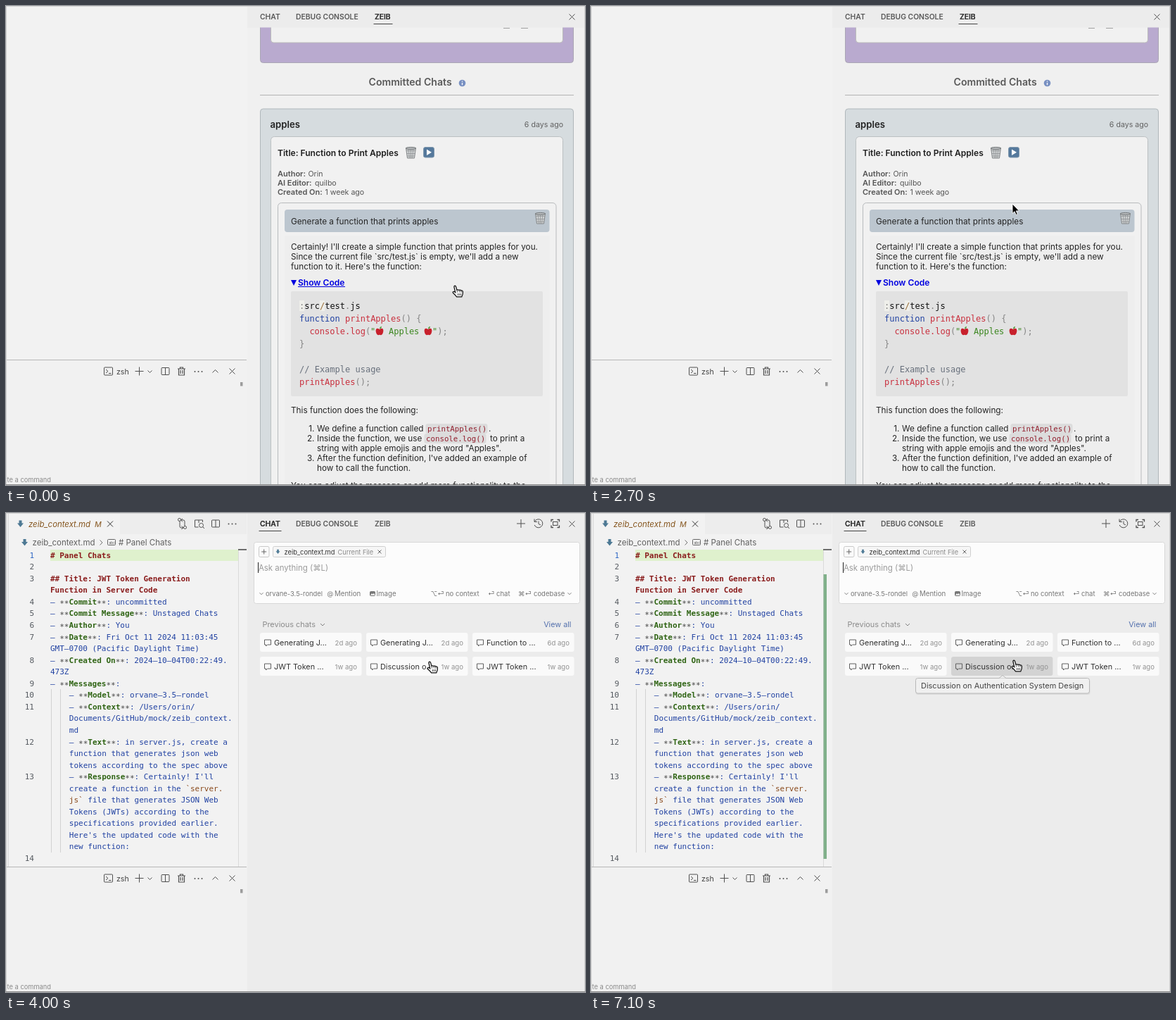
An HTML page for the animation above (7200 ms loop, 823 by 680 pixels).

```html
<!DOCTYPE html>
<html lang="en">
<head>
<meta charset="utf-8">
<title>Committed chats panel</title>
<style>
html, body { margin: 0; width: 100%; height: 100%; overflow: hidden; background: #f2f2f2; }
svg { display: block; }
text { font-family: Inter, "DejaVu Sans", sans-serif; white-space: pre; }
.mono { font-family: "DejaVu Sans Mono", monospace; }
.bold { font-weight: 600; }
.end { text-anchor: end; }
.italic { font-style: italic; }
</style>
</head>
<body>
<svg id="stage" width="823" height="680" viewBox="0 0 823 680"></svg>
<script>
const LOOP = 7200, FILE = 'zeib_context.md', MODEL = 'orvane-3.5-rondel';

const text = (x, y, s, size = 11.75, fill = '#242424', cls = '') =>
  `<text x="${x}" y="${y}" font-size="${size}" fill="${fill}" class="${cls}">${s}</text>`;
const box = (x, y, w, h, fill, stroke = 'none', r = 0) =>
  `<rect x="${x}" y="${y}" width="${w}" height="${h}" rx="${r}" fill="${fill}" stroke="${stroke}"/>`;
const circle = (x, y, r, fill, stroke = 'none') =>
  `<circle cx="${x}" cy="${y}" r="${r}" fill="${fill}" stroke="${stroke}"/>`;
const line = (d, stroke = '#505050', width = 1, fill = 'none') =>
  `<path d="${d}" stroke="${stroke}" stroke-width="${width}" fill="${fill}"/>`;
const shape = (d, fill) => `<path d="${d}" fill="${fill}"/>`;
const span = (s, fill, cls = '') => `<tspan fill="${fill}" class="${cls}">${s}</tspan>`;
const group = (id, s) => `<g id="${id}">${s}</g>`;

const cross = (x, y, r = 4, c) => line(`M${x - r} ${y - r}l${2 * r} ${2 * r}m0 ${-2 * r}l${-2 * r} ${2 * r}`, c);
const plus = (x, y, r = 6, c) => line(`M${x - r} ${y}h${2 * r}M${x} ${y - r}v${2 * r}`, c);
const chevron = (x, y, r = 3, c = '#808080') => line(`M${x - r} ${y - r / 2}l${r} ${r}l${r} ${-r}`, c);
const dots = (x, y) => [-5, 0, 5].map(d => circle(x + d, y, 1, '#505050')).join('');
const split = (x, y) => box(x - 5.5, y - 5, 11, 10, 'none', '#505050', 1) + line(`M${x} ${y - 5}v10`);
const fileMark = (x, y, k = 1) =>
  shape(`M${x - 2 * k} ${y - 5 * k}h${4 * k}v${4 * k}h${2.5 * k}l${-4.5 * k} ${5.5 * k}l${-4.5 * k} ${-5.5 * k}h${2.5 * k}z`, '#4d7994');
const bubble = (x, y) => line(`M${x} ${y}h9v7h-5l-2 2v-2h-2z`, '#606060');

const bin = (x, y) => `<g transform="translate(${x} ${y})">`
  + line('M.5 1.5h14l-2 14.5h-10z', '#85888a', 1, '#cdd0d1')
  + line('M1 5.5h13M1.5 9.5h12M2 13h11M4 2l1.5 14M7.5 2v14M11 2l-1.5 14', '#8b8f91', .7)
  + `<ellipse cx="7.5" cy="2" rx="7.3" ry="1.6" fill="#b2b5b7" stroke="#74787a"/></g>`;
const apple = (x, y) => `<g transform="translate(${x} ${y})">`
  + shape('M6 3Q1-.2.6 5Q1 10.6 4 11.2Q6 10.5 8 11.2Q11 10.4 11.4 5Q11-.2 6 3', '#c8202c')
  + shape('M6 2.4Q6-.8 9-1Q8.8 2 6 2.4', '#4c9a35') + '</g>';

const ui = '#505050', red = '#c9303e', gray = '#858585', blue = '#2142a2', hint = '#777';

// Committed chat panel
const infoLine = (y, key, x, value) =>
  text(386, y, key, 11, '#555', 'bold') + text(x, y, value, 10.6, '#555');
const inlineCode = (x, y, s) => box(x, y - 11, 88, 14, '#dcdcdc', 'none', 3)
  + text(x + 2.5, y - .5, s, 10.75, '#93202f', 'mono');
const codeLine = (x, y, s) => text(x, y, s, 12, gray, 'mono');

const commits = box(343, 30, 480, 650, '#f0f0f0')
  + box(361.5, 10, 445, 70.5, '#b9aacf', '#aaa6b4', 4)
  + box(376.5, 10, 415, 42, '#f1f1f1', '#bbb', 4)
  + line('M707 31.5h9M732 31.5h10', '#a0a0a0')
  + text(515.5, 113, 'Committed Chats', 14.1, '#5a5a5a', 'bold')
  + circle(648.5, 109.5, 4.8, '#7890c2')
  + line('M648.5 109v3.3M648.5 106.5v1.3', '#fff', 1.3)
  + line('M361 126.5H807', '#b4b4b4')
  + box(361.5, 146, 445, 560, '#d6dcdf', '#b0b7bb', 4)
  + text(375.5, 173, 'apples', 13.15, '#222', 'bold')
  + text(792, 172, '6 days ago', 10.6, '#606060', 'end')
  + box(376.5, 185.5, 415, 520, '#f1f1f1', '#bcc0c2', 5)
  + group('titleHover', box(386, 195, 396.5, 26, '#bdc7d0'))
  + text(386, 213, 'Title: Function to Print Apples', 12.05, '#1f1f1f', 'bold')
  + bin(568, 200)
  + group('press', box(590, 196, 23, 24, '#aeb6bd', 'none', 4))
  + box(593.5, 200.5, 15, 14.5, '#55799c', '#8098ae', 2.5) + shape('M598 203.5v8.5l7-4.2z', '#fff')
  + infoLine(241.5, 'Author:', 429.5, 'Orin')
  + infoLine(254.5, 'AI Editor:', 439, 'quilbo')
  + infoLine(267.5, 'Created On:', 453.5, '1 week ago')
  + box(386.5, 279.5, 395.5, 430, '#f1f1f1', '#b8bbbd', 5)
  + box(396, 289, 376.5, 32, '#bcc6cf', 'none', 4)
  + text(405, 309.5, 'Generate a function that prints apples')
  + bin(752, 293)
  + box(396, 326, 376.5, 354, '#eeeeee')
  + text(405, 346, "Certainly! I'll create a simple function that prints apples for you.")
  + text(405, 360, "Since the current file `src/test.js` is empty, we'll add a new")
  + text(405, 374, "function to it. Here's the function:")
  + shape('M405 389h8l-4 8z', '#0000e0')
  + text(415, 396.5, 'Show Code', 12.05, '#0000e0', 'bold')
  + group('underline', line('M415 398.5h67', '#0000e0'))
  + box(405, 405, 358, 149, '#e2e2e2', 'none', 2)
  + box(417, 418, 7, 15, '#efefea') + box(446, 418, 7, 15, '#efefea')
  + codeLine(417, 430, ':' + span('src', '#111') + span('/', '#9a6e3a') + span('test', '#111') + '.' + span('js', '#111'))
  + codeLine(417, 448, span('function', blue) + span(' printApples', red) + '() {')
  + codeLine(431.4, 466, span('console.log', red) + '(' + span('"', '#3b861f'))
  + apple(525, 456) + text(544, 466, 'Apples', 12, '#3b861f', 'mono') + apple(594, 456)
  + codeLine(606, 466, span('"', '#3b861f') + ');')
  + codeLine(417, 484, '}')
  + codeLine(417, 520, span('// Example usage', '#68707c'))
  + codeLine(417, 538, span('printApples', red) + '();')
  + text(405, 578, 'This function does the following:')
  + [604, 618, 646].map((y, i) => text(438.5, y, i + 1 + '.', 11.75, '#242424', 'end')).join('')
  + text(442, 604, 'We define a function called') + inlineCode(596.5, 604, 'printApples()') + text(686, 604, '.')
  + text(442, 618, 'Inside the function, we use') + inlineCode(594.5, 618, 'console.log()') + text(688, 618, 'to print a')
  + text(442, 632, 'string with apple emojis and the word "Apples".')
  + text(442, 646, "After the function definition, I've added an example of")
  + text(442, 660, 'how to call the function.')
  + text(405, 684.5, 'You can adjust the message or add more functionality to the');

// Markdown editor: [line number, columns of indent, text]
const rows = [
  [1, 0, '# Panel Chats'], [2, 0, ''], [3, 0, '## Title: JWT Token Generation'], [0, 0, 'Function in Server Code'],
  [4, 0, '- **Commit**: uncommitted'], [5, 0, '- **Commit Message**: Unstaged Chats'], [6, 0, '- **Author**: You'],
  [7, 0, '- **Date**: Fri Oct 11 2024 11:03:45'], [0, 0, 'GMT-0700 (Pacific Daylight Time)'],
  [8, 0, '- **Created On**: 2024-10-04T00:22:49.'], [0, 0, '473Z'], [9, 0, '- **Messages**:'],
  [10, 4, `- **Model**: ${MODEL}`], [11, 4, '- **Context**: /Users/orin/'],
  [0, 4, `Documents/GitHub/mock/${FILE.slice(0, -2)}`], [0, 4, 'md'],
  [12, 4, '- **Text**: in server.js, create a'], [0, 4, 'function that generates json web'],
  [0, 4, 'tokens according to the spec above'], [13, 4, "- **Response**: Certainly! I'll"],
  [0, 4, 'create a function in the `server.'], [0, 4, 'js` file that generates JSON Web'],
  [0, 4, 'Tokens (JWTs) according to the'], [0, 4, 'specifications provided earlier.'],
  [0, 4, "Here's the updated code with the"], [0, 4, 'new function:'], [14, 0, ''], [0, 0, span('### Response', '#999')]
];
// Long dashes and centred asterisks, as the editor font draws them
const stars = span('∗∗', '#444');
const paint = (s, i) => {
  if (i < 4) return span(s, '#8a1c1c', 'mono bold');
  return s.split(/(\*\*.+?\*\*|`server\.$|^js`)/).map(p =>
    p.startsWith('**') ? stars + span(p.slice(2, -2), '#2f6414', 'mono bold') + stars
      : p.includes('`') ? span(p, '#8a4a1c') : p.replaceAll('-', '–')).join('');
};
const editor = box(63, 52, 267, 16, '#dff1cd')
  + line('M330.5 52V502', '#dadada') + box(330, 51, 12, 2, '#6e6e6e')
  + line('M64.5 250V482M77.5 250V482', '#d2d2d2')
  + rows.map(([n, indent, s], i) => {
    const y = +(63.7 + 16.55 * i).toFixed(1);
    return (n ? text(40, y, n, 11, n > 1 ? '#555a60' : '#2f66c4', 'mono end') : '')
      + text(63 + indent * 6.7, y, paint(s, i), 11, blue, 'mono');
  }).join('')
  + line('M133.5 38.5l3.5 3.5l-3.5 3.5', '#707070')
  + box(144.5, 37.5, 11, 8, 'none', '#666', 1) + text(146.5, 44, 'abc', 5, '#555')
  + text(160, 46, '# Panel Chats', 11.5, '#606060')
  + line('M247 11v8a2 2 0 0 0 2 2h3M249.5 18.5l2.5 2.5l-2.5 2M254 19v-7a2 2 0 0 0-2-2h-3M251 12.5l-2.5-2.5l2.5-2')
  + circle(246.5, 9.5, 2, '#ededed', ui) + circle(254.5, 20.5, 2, '#ededed', ui)
  + line('M279.5 13v-3h-11v10h5M274 10v4M280 20l2 2') + circle(277.5, 17.5, 3, 'none', ui);

const tab = box(0, 0, 3, 502, '#ececec') + line('M3.5 0V502', '#dcdcdc')
  + box(162, 1, 180, 29, '#ededed')
  + fileMark(20.5, 15.5) + text(32, 19.5, FILE, 11.4, '#85551d', 'italic')
  + text(126, 19.5, 'M', 10.8, '#85551d', 'italic')
  + cross(148, 15.5, 4, '#333') + split(298, 15) + dots(321.5, 15.5)
  + fileMark(26.5, 42) + text(37.5, 46, FILE, 11.5, '#606060');

// New chat panel
const tiles = [['Generating J...', '2d'], ['Generating J...', '2d'], ['Function to ...', '6d'],
  ['JWT Token ...', '1w'], ['Discussion o...', '1w'], ['JWT Token ...', '1w']];
const tile = ([s, age], i) => {
  const x = 361 + i % 3 * 151, y = i < 3 ? 170 : 204;
  return box(x, y, 144.5, 27, '#fafafa', 'none', 3)
    + (i === 4 ? group('tileHover', box(x, y, 144.5, 27, '#d3d3d3', 'none', 3)) : '')
    + bubble(x + 6.5, y + 10) + text(x + 20, y + 18, s, 10.87, '#333')
    + text(x + 138, y + 17.5, age + ' ago', 9.6, '#929292', 'end');
};
const chat = box(343, 30, 480, 650, '#ececec')
  + plus(732, 15, 6)
  + line('M751.5 12a6 6 0 1 1-.3 5M751 8.5v4h4M757 11.5v4l3 1.5')
  + line('M775 12.5v-3h3M783.5 9.5h3v3M786.5 17.5v3h-3M778 20.5h-3v-3', ui, 1.3)
  + box(777.5, 12.5, 6.5, 5, 'none', ui)
  + box(352.5, 41.5, 463, 87, '#fcfcfc', '#d8d8d8', 3)
  + box(359.5, 47.5, 14.5, 15, '#fafafa', '#c9c9c9', 2) + plus(366.7, 55, 3.5, '#666')
  + box(379.5, 47.5, 160, 15, '#f6f6f6', '#cfcfcf', 2) + fileMark(386.5, 55, .65)
  + text(395.5, 58.5, FILE, 9.3, '#333') + text(471.5, 58.5, 'Current File', 9.2, '#8c8c8c') + cross(531, 55, 2.5, '#666')
  + text(359, 81.5, 'Ask anything (⌘L)', 11.4, '#9a9a9a')
  + chevron(363, 114.5, 2.5) + text(369, 118, MODEL, 9.4, hint)
  + text(456.5, 118, '@', 9, hint) + text(467, 118, 'Mention', 9.7, hint)
  + box(517.5, 111.5, 7, 6, hint, hint, 1) + shape('M518 117l2-3l1.5 1.5l1.5-2l1.5 3.5z', '#eee')
  + text(526.5, 118, 'Image', 9.7, hint)
  + text(603.5, 118, '⌥⏎', 9.5, hint) + text(625, 118, 'no context', 9.5, hint)
  + text(685, 118, '⏎', 9.5, hint) + text(697, 118, 'chat', 9.5, hint)
  + text(728, 118, '⌘⏎', 9.5, hint) + text(750, 118, 'codebase', 9.5, hint) + chevron(801, 114.5, 2.5)
  + text(364.5, 162, 'Previous chats', 10.9, '#8b8b8b') + chevron(450, 158.5)
  + text(803.5, 162, 'View all', 10.8, '#5471ad', 'end')
  + tiles.map(tile).join('')
  + group('caret', line('M358.5 70V85', '#222'))
  + group('tip', box(461.5, 236, 248, 22, '#0001', 'none', 3)
    + box(461.5, 234.5, 247, 21.5, '#f0f0f0', '#b8b8b8', 3)
    + line('M580 234.5l5-4l5 4', '#b8b8b8', 1, '#f0f0f0')
    + text(469, 249, 'Discussion on Authentication System Design', 10.97, '#444'));

const terminal = box(0, 502, 343, 178, '#f1f1f1') + line('M0 502.5H342', '#b8b8b8')
  + box(139.5, 513, 12, 11, 'none', ui, 1) + line('M142 516l3 2.5l-3 2.5M146 521.5h3.5')
  + text(157, 522.5, 'zsh', 10.6, '#444')
  + plus(189.5, 518.5) + chevron(204.5, 519, 3, ui) + split(226.5, 518.5)
  + line('M244 515h11M247.5 515v-2h4v2M245.5 515v9h8v-9M248 517v5M251 517v5', ui, 1.2)
  + dots(273.5, 519) + line('M293.5 520.5l4-4l4 4') + cross(321.5, 518.5)
  + box(333, 534, 3.5, 5.5, '#9c9c9c')
  + text(64, 676, 'Generate a command', 9.3, '#8b8b8b', 'end');

const header = box(343, 0, 480, 30.5, '#ececec')
  + [[361, 'CHAT'], [412, 'DEBUG CONSOLE'], [524, 'ZEIB']].map(([x, s]) => text(x, 19, s, 10.35, '#585858', 'bold')).join('')
  + cross(804.5, 15.5);
const activeTab = (x, w, name) => line(`M${x - 1.5} 25.5h${w + 2}`, '#444') + text(x, 19, name, 10.35, '#333', 'bold');

document.getElementById('stage').innerHTML = box(0, 0, 823, 680, '#f2f2f2')
  + group('commits', commits)
  + header
  + group('commitsTab', activeTab(524, 25, 'ZEIB'))
  + group('tab', tab)
  + group('opened', editor + chat + activeTab(361, 30, 'CHAT'))
  + group('added', box(330.5, 87, 4.5, 404, '#80b08a'))
  + terminal
  + line('M0 .5H823M.5 0V680M822.5 0V680', '#d4d4d4') + line('M0 679.5H823', '#8d8d8d')
  + group('arrow', line('M0 0V13.5L3.1 10.7L5.2 15.5L7.4 14.5L5.3 9.9H9.6Z', '#fff', .9, '#000'))
  + group('hand', line('M-3 1.2Q-3.2-.8-1.8-.9Q-.8-.9-.4.6L.9 5.2Q3 4.3 4 5.4Q6 4.7 6.7 6Q9 5.6 9.4 7.7Q9.8 11 7.8 14.8H.6Q-1.6 12-4.6 9.2Q-5.2 7.3-3.4 7.3L-1.3 8.6Z', '#111', 1.3, '#fff')
    + line('M1 5.5l.6 3M4 5.6l.5 2.8M6.7 6.3l.3 2.5M2.5 10v3M4.5 10v3M6.5 10v3', '#222', .8));

const $ = id => document.getElementById(id);
const show = (id, on) => { $(id).style.display = on ? '' : 'none'; };

// Pointer stops: [time, x, y]
const path = [[0, 640, 398], [1750, 640, 398], [2700, 599, 281], [3250, 604, 212], [4150, 604, 212],
  [4200, 605, 210], [5600, 605, 210], [5700, 603, 210], [LOOP, 603, 210]];
function pointerAt(t) {
  const i = path.findIndex(p => p[0] > t);
  const [t0, x0, y0] = path[i - 1], [t1, x1, y1] = path[i];
  const u = (t - t0) / (t1 - t0), k = u * u * (3 - 2 * u);
  return [x0 + (x1 - x0) * k, y0 + (y1 - y0) * k];
}

function draw(now) {
  const t = now % LOOP, open = t >= 4000;
  const [x, y] = pointerAt(t);
  const hand = t < 4200 ? y > 384 || y < 220 : t >= 5700;
  show('commits', !open);
  show('commitsTab', !open);
  show('underline', y > 384);
  show('titleHover', y < 221);
  show('press', y < 220);
  show('tab', t >= 3800);
  show('opened', open);
  show('added', t >= 4300);
  show('caret', t % 1000 < 500);
  show('tileHover', t >= 5700);
  show('tip', t >= 6200);
  show('hand', hand);
  show('arrow', !hand);
  for (const id of ['hand', 'arrow']) $(id).setAttribute('transform', `translate(${x} ${y})`);
  requestAnimationFrame(draw);
}
draw(0);
</script>
</body>
</html>
```
